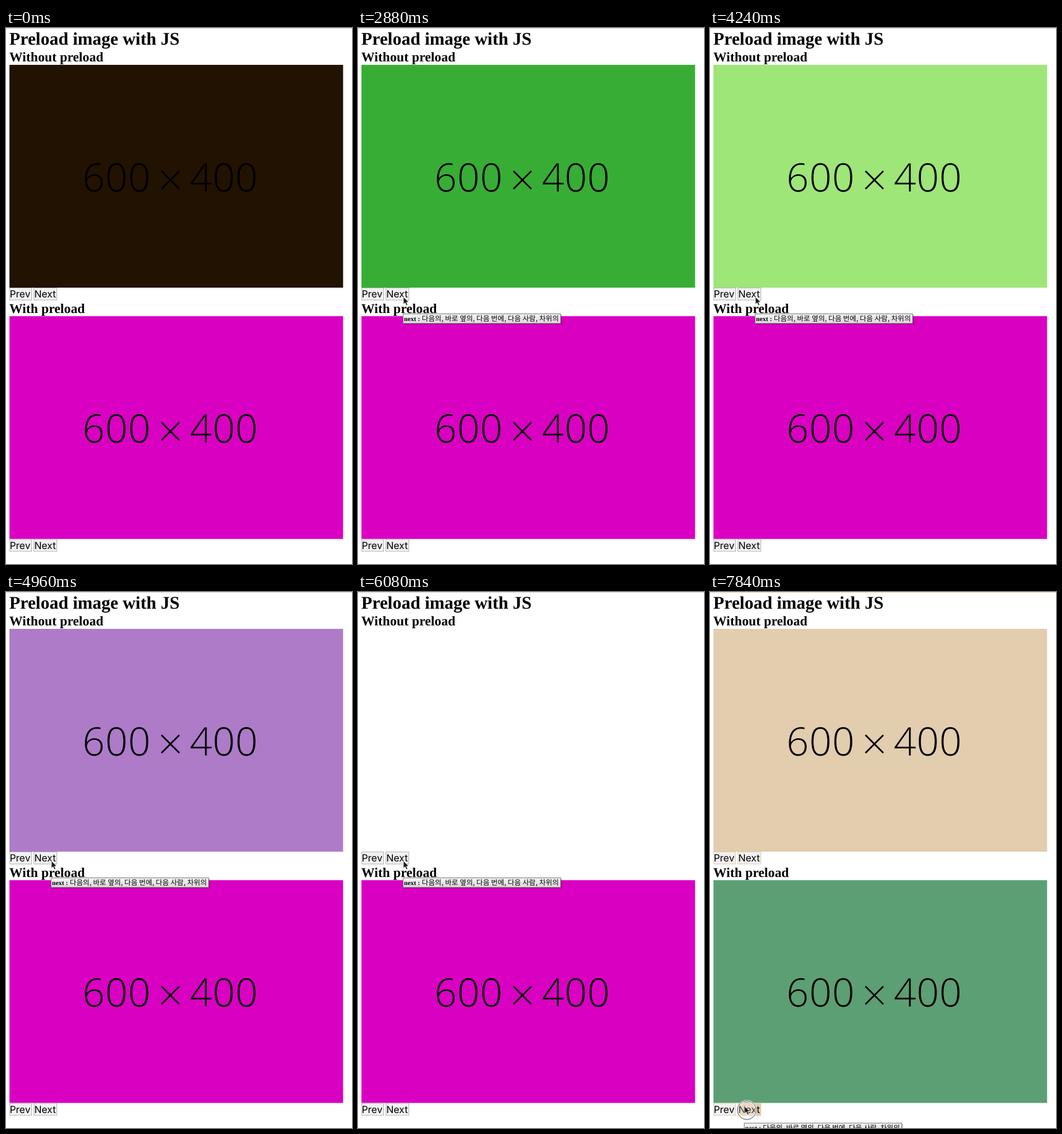
Animation of 602 by 931 pixels, one loop 8 s. Source, as an HTML page:

```html
<!DOCTYPE html>
<html lang="en">
<head>
<meta charset="utf-8">
<title>Preload image with JS</title>
<style>
  html, body { margin: 0; width: 100%; height: 100%; overflow: hidden; background: #fff; }
  svg { display: block; width: 602px; height: 931px; text-rendering: geometricPrecision; }

  .serif { font-family: "Liberation Serif", "Times New Roman", serif; font-weight: 700; }
  .h1 { font-size: 30.96px; }
  .h2 { font-size: 23.22px; }
  .size { font: 300 68px "Open Sans", "Noto Sans", sans-serif; letter-spacing: .9px; }
  .label { font: 400 17px Inter, Roboto, sans-serif; }
  .hint { font: 300 12.4px "Noto Sans CJK KR", "Noto Sans CJK", sans-serif; }
  .hint .serif { font-size: 11.5px; font-weight: 700; }
  .cross { fill: none; stroke: #000; stroke-width: 2.9; }

  /* One percent of the loop is 80 ms. */
  .step { animation: 8s step-end infinite; }
  .first { animation-name: first; }
  .second { animation-name: second; }
  .loaded { animation-name: loaded; }
  .edge { fill: #f1f1f1; stroke: #b4b4b4; animation-name: edge; }
  .rule { fill: #d0d0d0; animation-name: rule; }
  .pressed { animation-name: pressed; }
  .shown { animation-name: shown; }
  .ring { animation-name: ring; }
  .tipA { animation-name: tipA; }
  .tipB { animation-name: tipB; }
  .pointer { animation: move 8s linear infinite; }

  @keyframes first {
    0% { fill: #211201; }
    31% { fill: #38ad35; }
    45% { fill: #9ee678; }
    61% { fill: #ae7bc9; }
    74%, 100% { fill: #e2cdae; }
  }
  @keyframes loaded {
    0%, 33%, 47%, 62%, 79%, 100% { opacity: 1; }
    31%, 45%, 61%, 74% { opacity: 0; }
  }
  @keyframes second {
    0% { fill: #d900c2; }
    97%, 100% { fill: #5d9f74; }
  }
  @keyframes edge {
    0% { stroke: #b4b4b4; }
    79%, 100% { stroke: #e2cdae; }
  }
  @keyframes rule {
    0% { fill: #d0d0d0; }
    79%, 100% { fill: #e2cdae; }
  }
  @keyframes pressed {
    0% { opacity: 0; }
    96%, 100% { opacity: 1; }
  }
  @keyframes shown {
    0% { opacity: 0; }
    4%, 100% { opacity: 1; }
  }
  @keyframes ring {
    0%, 23%, 41%, 58%, 70% { opacity: 0; }
    21%, 40%, 57%, 69%, 96%, 100% { opacity: 1; }
  }
  @keyframes tipA {
    0%, 81%, 100% { opacity: 0; }
    34% { opacity: 1; }
  }
  @keyframes tipB {
    0% { opacity: 0; }
    91%, 100% { opacity: 1; }
  }
  @keyframes move {
    0%, 4% { transform: translate(306px, 20px); animation-timing-function: ease-in; }
    10% { transform: translate(120px, 360px); }
    13% { transform: translate(36px, 455px); }
    15% { transform: translate(62px, 479px); animation-timing-function: ease-out; }
    17%, 81% { transform: translate(79px, 467px); animation-timing-function: ease-in-out; }
    87%, 100% { transform: translate(60px, 893px); }
  }
</style>
</head>
<body>
<svg viewBox="0 0 602 931" xmlns="http://www.w3.org/2000/svg">
  <defs>
    <linearGradient id="paper" x2="0" y2="1">
      <stop stop-color="#f4f4f4"/>
      <stop offset="1" stop-color="#dcdcdc"/>
    </linearGradient>
    <g id="caption">
      <text class="size" x="133" y="283.5">600</text>
      <path class="cross" d="M270.5 248.5l31 31m0-31l-31 31"/>
      <text class="size" x="319.7" y="283.5">400</text>
    </g>
    <g id="tip">
      <rect x="2" y="2" width="275" height="17" fill="#000" opacity=".22"/>
      <rect x=".5" y=".5" width="274" height="16.5" fill="url(#paper)" stroke="#777"/>
      <text class="hint" y="12.6"><tspan class="serif" x="2">next :</tspan><tspan x="33">다음의, 바로 옆의, 다음 번에, 다음 사람, 차위의</tspan></text>
    </g>
  </defs>

  <rect width="602" height="931" fill="#fff"/>
  <rect class="step rule" width="602" height="1"/>
  <text class="serif h1" x="5.8" y="29.2">Preload image with JS</text>

  <text class="serif h2" x="5.8" y="58.2">Without preload</text>
  <g class="step loaded">
    <rect class="step first" x="6" y="64" width="580.5" height="387"/>
    <use href="#caption"/>
  </g>
  <rect class="step edge" x="6.5" y="451.5" width="38" height="21"/>
  <rect class="step edge" x="48.5" y="451.5" width="40" height="21"/>
  <text class="label" x="6.4" y="468.4">Prev</text>
  <text class="label" x="49.2" y="468.4">Next</text>

  <g transform="translate(0 436.5)">
    <text class="serif h2" x="5.8" y="58.2">With preload</text>
    <rect class="step second" x="6" y="64" width="580.5" height="387"/>
    <use href="#caption"/>
    <rect class="step edge" x="6.5" y="451.5" width="38" height="21"/>
    <rect class="step edge" x="48.5" y="451.5" width="40" height="21"/>
    <rect class="step pressed" x="48" y="451" width="41" height="22" fill="#e2cdae"/>
    <text class="label" x="6.4" y="468.4">Prev</text>
    <text class="label" x="49.2" y="468.4">Next</text>
  </g>

  <g class="step tipA"><use href="#tip" x="78" y="496"/></g>
  <g class="step tipB"><use href="#tip" x="59" y="922"/></g>

  <g class="pointer">
    <g class="step ring">
      <circle cx="4" cy="7" r="16" fill="#fff" fill-opacity=".25" stroke="#fff" stroke-width="3"/>
      <circle cx="4" cy="7" r="16.3" fill="none" stroke="#444"/>
    </g>
    <path class="step shown" d="M0 0V13L3 10.2L5.2 15L7.5 14L5.4 9.3H9.4Z" fill="#1c1c1c" stroke="#fff" stroke-width=".8"/>
  </g>
</svg>
</body>
</html>
```
